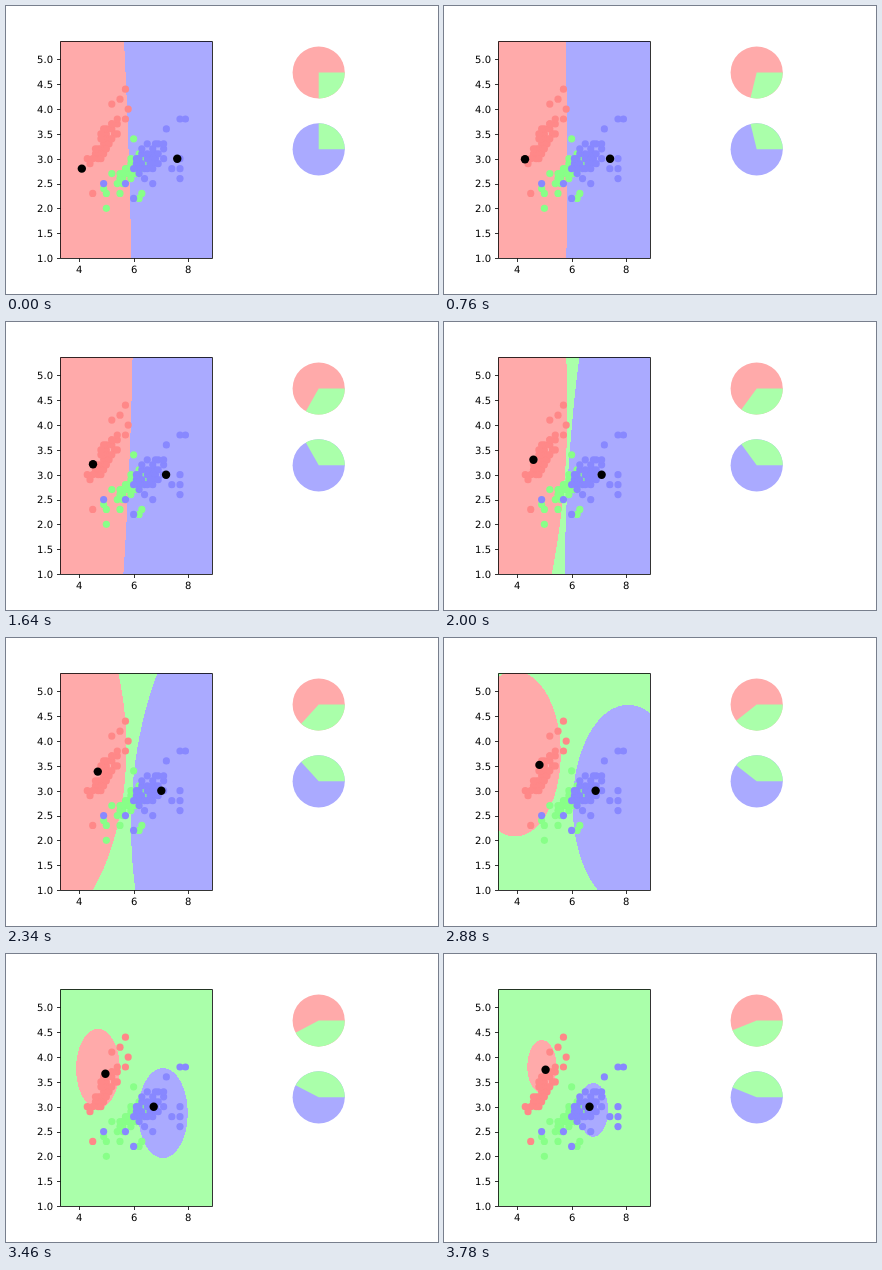
An HTML page with a canvas that plays this animation: 432 by 288 pixels, repeating every 3800 ms.

```html
<!DOCTYPE html>
<html lang="en">
<head>
<meta charset="utf-8">
<title>Soft-label prototypes</title>
<style>
  html, body { margin: 0; width: 432px; height: 288px; overflow: hidden; background: #fff; }
  canvas, svg { position: absolute; display: block; }
  canvas { left: 54px; top: 35px; }
  svg { left: 0; top: 0; }
  text { font: 10px "DejaVu Sans", sans-serif; text-rendering: geometricPrecision; }
</style>
</head>
<body>
<canvas id="field" width="152" height="217"></canvas>
<svg id="plot" width="432" height="288"></svg>
<script>
const STEP = 20, STEPS = 190;
const LIGHT = ['#ffaaaa', '#aaffaa', '#aaaaff'];
const BOLD = ['#ff8888', '#88ff88', '#8888ff'];
const RGB = [[255, 170, 170], [170, 255, 170], [170, 170, 255]];

const LEFT = 54, BOTTOM = 252, X0 = 3.3, Y0 = 1;
const SX = 152.18 / 5.58, SY = 217.44 / 4.38;
const px = x => LEFT + (x - X0) * SX;
const py = y => BOTTOM - (y - Y0) * SY;

// Each class is a tilted core of points plus its outliers.
const CLASSES = [
  { x: 4.95, y: 3.35, rx: .48, ry: .28, tilt: .7, count: 30,
    far: [[4.5, 2.3], [4.3, 3], [4.4, 2.9], [5.2, 4.1], [5.5, 4.2], [5.7, 4.4], [5.8, 4], [5.7, 3.8]] },
  { x: 5.95, y: 2.8, rx: .6, ry: .2, tilt: .35, count: 26,
    far: [[5, 2], [5, 2.3], [4.9, 2.4], [5.2, 2.7], [5.5, 2.3], [6.2, 2.2], [6.3, 2.3], [6, 3.4]] },
  { x: 6.55, y: 3, rx: .6, ry: .32, tilt: .3, count: 30,
    far: [[4.9, 2.5], [5.7, 2.5], [6, 2.2], [6.7, 2.5], [7.7, 2.6], [7.7, 2.8], [7.4, 2.8],
      [7.7, 3], [7.2, 3.6], [7.7, 3.8], [7.9, 3.8]] }
];

const svg = document.getElementById('plot');
const ctx = document.getElementById('field').getContext('2d');
const image = ctx.createImageData(152, 217);

function add(tag, attrs, text) {
  const el = document.createElementNS('http://www.w3.org/2000/svg', tag);
  for (const key in attrs) el.setAttribute(key, attrs[key]);
  if (text) el.textContent = text;
  return svg.appendChild(el);
}
const dot = (x, y, r, fill) => add('circle', { cx: px(x), cy: py(y), r, fill });
const line = d => add('path', { d, fill: 'none', stroke: '#000', 'stroke-width': .8 });
const tenth = v => Math.round(v * 10) / 10;

CLASSES.forEach(({ x, y, rx, ry, tilt, count, far }, kind) => {
  for (let i = 0; i < count; i++) {
    const r = Math.sqrt((i + .5) / count), angle = i * 2.4;
    const dx = rx * r * Math.cos(angle), dy = ry * r * Math.sin(angle);
    dot(tenth(x + dx), tenth(y + dy + tilt * dx), 3.6, BOLD[kind]);
  }
  for (const [fx, fy] of far) dot(fx, fy, 3.6, BOLD[kind]);
});
const protos = [dot(0, 0, 4.2, '#000'), dot(0, 0, 4.2, '#000')];

line('M54.5 35.5H206.5V252.5H54.5Z');
for (let x = 4; x <= 8; x += 2) {
  line(`M${Math.round(px(x)) + .5} 252.5v3.5`);
  add('text', { x: Math.round(px(x) - 3.1), y: 267 }, String(x));
}
for (let y = 1; y <= 5; y += .5) {
  line(`M54.5 ${Math.round(py(y)) + .5}h-3.5`);
  add('text', { x: 47, y: Math.round(py(y) + 3.8), 'text-anchor': 'end' }, y.toFixed(1));
}

const PIE_X = 312.7, PIE_R = 26.1;
function makePie(cy, back, front) {
  add('circle', { cx: PIE_X, cy, r: PIE_R, fill: LIGHT[back] });
  return add('path', { fill: LIGHT[front] });
}
const pies = [makePie(66.5, 0, 1), makePie(143.3, 2, 1)];

// Green wedge from three o'clock; dir 1 opens downwards, -1 upwards.
function setWedge(el, cy, share, dir) {
  const angle = share * 2 * Math.PI;
  const x = PIE_X + PIE_R * Math.cos(angle), y = cy + dir * PIE_R * Math.sin(angle);
  el.setAttribute('d', `M${PIE_X} ${cy}h${PIE_R}A${PIE_R} ${PIE_R} 0 0 ${dir > 0 ? 1 : 0} ${x} ${y}Z`);
}

// Each pixel takes the class with the largest distance-weighted vote.
function paintField(p, q, a, b) {
  const data = image.data;
  let at = 0;
  for (let j = 0; j < 217; j++) {
    const y = Y0 + (BOTTOM - 35.5 - j) / SY;
    for (let i = 0; i < 152; i++) {
      const x = X0 + (i + .5) / SX;
      const near1 = 1 / Math.hypot(x - p[0], y - p[1]);
      const near2 = 1 / Math.hypot(x - q[0], y - q[1]);
      const red = a * near1, blue = b * near2;
      const green = (1 - a) * near1 + (1 - b) * near2;
      const c = RGB[red > green && red > blue ? 0 : blue > green ? 2 : 1];
      data[at++] = c[0];
      data[at++] = c[1];
      data[at++] = c[2];
      data[at++] = 255;
    }
  }
  ctx.putImageData(image, 0, 0);
}

function draw(n) {
  const move = .005 * n, main = .75 - .001 * n;
  const points = [[4.1 + move, 2.8 + move], [7.6 - move, 3]];
  points.forEach(([x, y], i) => {
    protos[i].setAttribute('cx', px(x));
    protos[i].setAttribute('cy', py(y));
  });
  setWedge(pies[0], 66.5, 1 - main, 1);
  setWedge(pies[1], 143.3, 1 - main, -1);
  // Blue weighs slightly more until the end.
  const lean = 1 - (n / STEPS) ** 8;
  paintField(points[0], points[1], main - .002 * lean, main + .0155 * lean);
}

const start = performance.now();
let shown = -1;
function tick() {
  const n = Math.floor((performance.now() - start) / STEP) % STEPS;
  if (n !== shown) draw(shown = n);
  requestAnimationFrame(tick);
}
draw(shown = 0);
requestAnimationFrame(tick);
</script>
</body>
</html>
```
